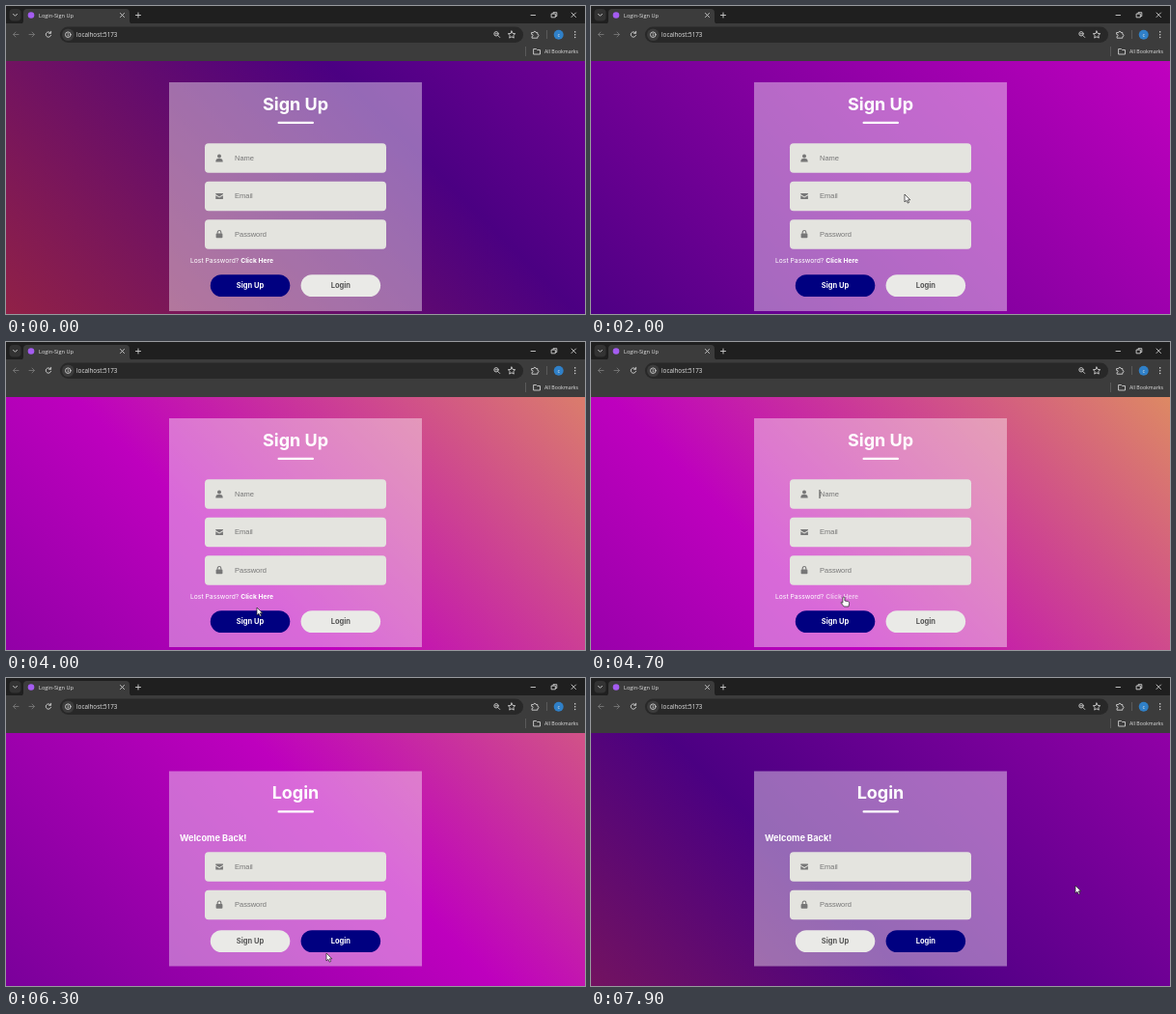
Recreate the animation shown at these times as an HTML page. Size 600 by 319 pixels, loop 8 s.

```html
<!DOCTYPE html>
<html lang="en">
<head>
<meta charset="utf-8">
<title>Login-Sign Up</title>
<style>
html, body { margin: 0; width: 100%; height: 100%; overflow: hidden; background: #3c3c3c; }
#page {
  position: absolute; left: 0; top: 57px; width: 600px; height: 262px;
  background: linear-gradient(45deg, #b0302c, #4b0082, #be00be, #eccb38) 0 50% / 300% 300%;
}
svg { position: absolute; left: 0; top: 0; }
text { font-family: Inter, sans-serif; }
.ui { font-family: "Open Sans", sans-serif; fill: #e3e3e3; }
.hint { font: 7.5px "Liberation Sans", Arial, sans-serif; fill: #777; }
.bold { font-weight: 700; }
.line { fill: none; stroke: #d0d0d0; stroke-width: .9; stroke-linecap: round; stroke-linejoin: round; }
.dim { stroke: #777; }
.icon { fill: #777; }
</style>
</head>
<body>
<div id="page"></div>
<svg width="600" height="319" viewBox="0 0 600 319">
  <rect width="600" height="19" fill="#1f1f1f"/>
  <rect y="18" width="600" height="39" fill="#3c3c3c"/>
  <rect x="3.5" y="3" width="12" height="12.5" rx="4" fill="#333"/>
  <path class="line" d="M7.5 8.3l2 2 2-2"/>
  <path d="M14 19q4 0 4-4V7q0-4 4-4h102q4 0 4 4v8q0 4 4 4z" fill="#3c3c3c"/>
  <circle cx="26" cy="9.5" r="3.3" fill="#a45cf0"/>
  <text class="ui" x="34" y="11.7" font-size="5.6">Login-Sign Up</text>
  <path class="line" d="M118.5 7.5l4 4m0-4l-4 4M134.5 9.5h5m-2.5-2.5v5M544 9.5h4.5M565.5 8h3.8v3.8h-3.8zM567 8V6.7h3.8v3.8h-1.3M586 7l4.5 4.5m0-4.500l-4.500 4.500"/>

  <path class="line dim" d="M13 29.500H7.500m2.500-2.500l-2.500 2.500 2.500 2.500M24 29.500h5.500m-2.500-2.500l2.500 2.500-2.500 2.500"/>
  <path class="line" d="M46 27.700a2.700 2.700 0 1 0 .6 2.600M46.600 26.300v2h-2"/>
  <rect x="56" y="21.500" width="480" height="16.500" rx="8.250" fill="#282828"/>
  <circle cx="64.300" cy="29.700" r="6.300" fill="#3c3c3c"/>
  <circle class="line" cx="64.300" cy="29.700" r="2.800"/>
  <path class="line" d="M64.300 29.700v1.300M64.300 28.300v.1"/>
  <text class="ui" x="73" y="32" font-size="6.300">localhost:5173</text>
  <circle class="line" cx="508" cy="28.800" r="2.200"/>
  <path class="line" d="M509.700 30.500l2 2M507 28.800h2"/>
  <path class="line" d="M524 26l1.100 2.400 2.600.3-1.900 1.800.5 2.600-2.300-1.300-2.300 1.300.5-2.600-1.900-1.800 2.600-.3z"/>
  <path class="line" d="M545 27.500h1.700a1.200 1.200 0 0 1 2.400 0h1.700v1.800a1.200 1.200 0 0 1 0 2.400v1.500H545v-1.700a1.100 1.100 0 0 0 0-2.200z"/>
  <path d="M560.500 25v9M538.500 42v10" stroke="#5a5a5a"/>
  <circle cx="572.700" cy="29.700" r="5" fill="#2f80c8"/>
  <text class="ui" x="572.700" y="31.700" font-size="5.500" text-anchor="middle">c</text>
  <path d="M589.700 26.800v.1m0 2.700v.1m0 2.700v.1" stroke="#ddd" stroke-width="1.400" stroke-linecap="round"/>
  <path class="line" d="M547 44.500h2.500l1 1h3v4.500H547z"/>
  <text class="ui" x="558" y="49" font-size="5.250">All Bookmarks</text>

  <g id="signup"></g>
  <g id="login"></g>
  <path id="caret" d="M237 153v9" stroke="#222" stroke-width=".8"/>
  <g id="cursor" stroke="#222" stroke-width=".7" stroke-linejoin="round" fill="#fff">
    <path id="arrow" d="M0 0v8l1.900-1.700 1.300 2.800 1.400-.6-1.300-2.700h2.500z"/>
    <path id="hand" d="M-1 0q1-1 2 0v3.500l3.800.9q1 .4.9 1.500l-.6 3.600H.2L-3 5.500q0-1.400 2 .2z"/>
  </g>
</svg>
<script>
const $ = id => document.getElementById(id);

const icons = {
  Name: '<circle cx="221" cy="-1.900" r="2"/><path d="M217.300 4.200q0-3.400 2.700-3.400h2q2.700 0 2.700 3.400z"/>',
  Email: '<path d="M217.300-2.800h7.600v1.200l-3.800 2.400-3.800-2.400zM217.300-.5l3.800 2.400 3.800-2.400v3.700h-7.600z"/>',
  Password: '<rect x="217.600" y="-.6" width="6.800" height="4.600" rx=".8"/>' +
    '<path d="M219.200-.4v-1.500a1.800 1.800 0 0 1 3.600 0v1.500" fill="none" stroke="#777" stroke-width="1.100"/>'
};

const field = (name, y) => `
  <rect x="206" y="${y}" width="188" height="30.500" rx="4" fill="#e4e4df"/>
  <g class="icon" transform="translate(0 ${y + 15})">${icons[name]}</g>
  <text class="hint" x="237" y="${y + 17.700}">${name}</text>`;

const button = (label, x, y, active) => `
  <rect x="${x}" y="${y}" width="82.500" height="22.800" rx="11.400" fill="${active ? '#000080' : '#eaeae7'}"/>
  <text class="bold" x="${x + 41.250}" y="${y + 14.200}" font-size="7.500" text-anchor="middle"
    fill="${active ? '#fff' : '#555'}">${label}</text>`;

const card = (title, top, height, fields, buttonY, extra) => `
  <rect x="169" y="${top}" width="262" height="${height}" fill="#fff" fill-opacity=".41"/>
  <text class="bold" x="300" y="${top + 28.700}" font-size="18" text-anchor="middle" fill="#fff">${title}</text>
  <rect x="281.500" y="${top + 40.800}" width="37.500" height="2.200" rx="1.100" fill="#fff"/>
  ${fields.map(f => field(...f)).join('')}
  ${button('Sign Up', 211.800, buttonY, title === 'Sign Up')}
  ${button('Login', 305.600, buttonY, title === 'Login')}
  ${extra}`;

$('signup').innerHTML = card('Sign Up', 79, 237,
  [['Name', 142.300], ['Email', 181.700], ['Password', 221.200]], 278.200,
  `<text x="191" y="265.500" font-size="6.750" fill="#fff">Lost Password?</text>
   <text id="link" class="bold" x="243.300" y="265.500" font-size="6.750" fill="#fff">Click Here</text>`);
$('login').innerHTML = card('Login', 96.500, 202,
  [['Email', 180.300], ['Password', 219.700]], 261.200,
  '<text class="bold" x="180" y="168.800" font-size="9.200" fill="#fff">Welcome Back!</text>');

// CSS "ease": cubic-bezier(.25, .1, .25, 1)
function ease(x) {
  const curve = (s, a, b) => 3 * s * (1 - s) ** 2 * a + 3 * s * s * (1 - s) * b + s ** 3;
  let lo = 0, hi = 1;
  for (let i = 0; i < 24; i++) {
    const mid = (lo + hi) / 2;
    if (curve(mid, .25, .25) < x) lo = mid; else hi = mid;
  }
  return curve(lo, .1, 1);
}

const LOOP = 8000, SWITCH = 5800;
// time, x, y of the pointer tip
const path = [
  [300, 400, 321], [1100, 339, 208], [2000, 325, 195], [2800, 285, 170],
  [4000, 260, 275], [4800, 262, 264], [5500, 325, 283],
  [6300, 332, 285], [6800, 340, 280], [7900, 502, 215], [8000, 502, 215]
];

function pointer(t) {
  const i = Math.max(1, path.findIndex(p => p[0] > t));
  const [t0, x0, y0] = path[i - 1], [t1, x1, y1] = path[i];
  const k = Math.max(0, (t - t0) / (t1 - t0)), s = k * k * (3 - 2 * k);
  return [x0 + (x1 - x0) * s, y0 + (y1 - y0) * s];
}

const show = (id, on) => $(id).style.display = on ? '' : 'none';

function draw(now) {
  const t = Math.floor(now % LOOP / 100) * 100;
  const phase = (t + 9500) % 10000 / 5000;
  const pos = phase < 1 ? ease(phase) : 1 - ease(phase - 1);
  $('page').style.backgroundPosition = `${pos * 100}% 50%`;

  const signup = t < SWITCH;
  show('signup', signup);
  show('login', !signup);
  show('caret', signup && t >= 4400 && (t - 4400) % 1000 < 500 || t === 5500);
  $('link').style.opacity = t >= 4700 ? .6 : 1;

  const [x, y] = pointer(t);
  const hand = t >= 4700 && t < 6000;
  show('cursor', t >= 300);
  show('arrow', !hand);
  show('hand', hand);
  $('cursor').setAttribute('transform', `translate(${x} ${y})`);
}

const start = performance.now();
(function tick() {
  draw(performance.now() - start);
  requestAnimationFrame(tick);
})();
</script>
</body>
</html>
```
